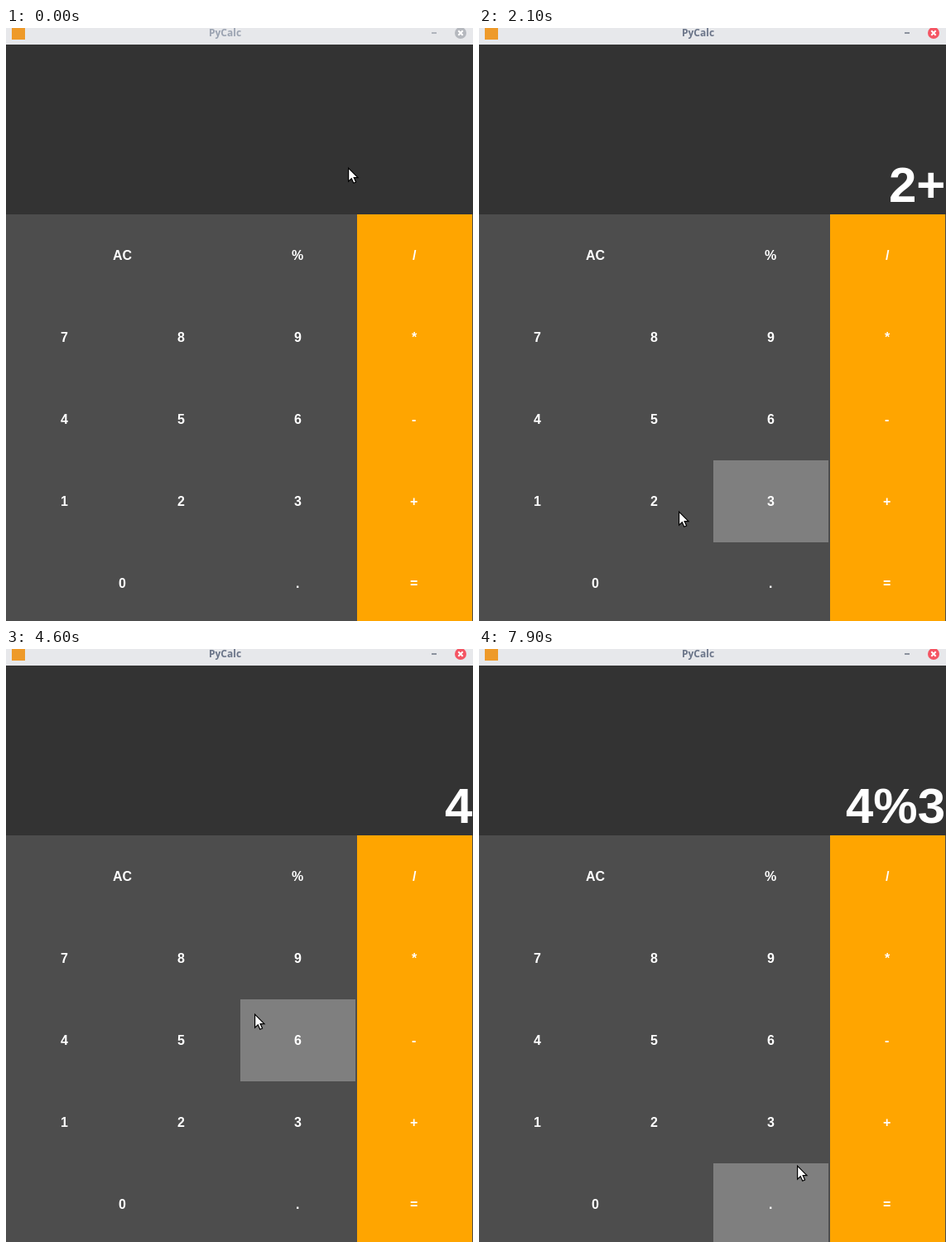
An HTML page with a canvas for the animation above (8 s loop, 564x716 px).

```html
<!DOCTYPE html>
<html lang="en">
<head>
<meta charset="utf-8">
<title>PyCalc</title>
<style>
html, body { margin: 0; width: 564px; height: 716px; overflow: hidden; background: #333; }
canvas { display: block; }
</style>
</head>
<body>
<canvas width="564" height="716"></canvas>
<script>
const ctx = document.querySelector("canvas").getContext("2d");
const LOOP = 8000, STEP = 100, HOVER_LAG = 80;
const SANS = "'Liberation Sans', Arial, sans-serif";

const buttons = ["AC|%|/", "7|8|9|*", "4|5|6|-", "1|2|3|+", "0|.|="].flatMap((line, row) => {
  const labels = line.split("|"), hasWide = labels.length === 3;
  return labels.map((label, i) => {
    const wide = hasWide && i === 0, col = i + (hasWide && i > 0 ? 1 : 0);
    return {
      label, y: 225 + row * 99,
      x: wide ? 4 : col * 141 + 1,
      w: wide ? 274 : 139,
      mid: wide ? 141 : col * 141 + 70.5,
      color: col === 3 ? "#ffa500" : "#4d4d4d"
    };
  });
});

// Stops of the pointer: first step, last step, x, y
const stops = [
  [0, 0, 413, 168], [300, 500, 350, 282], [700, 900, 248, 454], [1000, 1100, 222, 560],
  [1400, 1700, 455, 565], [1900, 2000, 330, 580], [2100, 2100, 241, 583],
  [2400, 2900, 462, 650], [3200, 3500, 255, 293], [4300, 4600, 300, 440],
  [4700, 5100, 359, 318], [5600, 5900, 350, 298], [6500, 6500, 318, 406],
  [6600, 6700, 337, 556], [7400, 7400, 345, 547], [7700, 7900, 384, 623]
];
const clicks = [1300, 1800, 2300, 3100, 6300, 7300];

const easeOut = p => 1 - (1 - p) ** 3;

function pointerAt(t) {
  let x = 0, y = 0;
  for (const [first, last, endX, endY] of stops) {
    const start = first - STEP;
    if (t <= start) break;
    const p = easeOut(Math.min(1, (t - start) / (last - start)));
    x += (endX - x) * p;
    y += (endY - y) * p;
  }
  return [Math.round(x), Math.round(y)];
}

function labelAt(t) {
  const [x, y] = pointerAt(t);
  return buttons.find(b => x >= b.x && x < b.x + b.w && y >= b.y && y < b.y + 99)?.label;
}

function press(shown, label) {
  if (label !== "=") return shown + label;
  return String(shown.split("+").reduce((sum, n) => sum + Number(n), 0));
}

// A clicked button stays unlit until the pointer leaves it.
function stateAt(t) {
  const pressed = clicks.filter(at => at <= t).map(labelAt);
  const under = labelAt(t - HOVER_LAG);
  return {
    shown: pressed.reduce(press, ""),
    hover: under === pressed.at(-1) ? null : under,
    focused: pressed.length > 0
  };
}

function rect(color, x, y, w, h) {
  ctx.fillStyle = color;
  ctx.fillRect(x, y, w, h);
}

// Text starts on a whole pixel; align is the part of its width left of x.
function text(str, x, y, font, color, align = 0.5, snap = Math.floor) {
  ctx.font = font;
  ctx.fillStyle = color;
  ctx.fillText(str, snap(x - ctx.measureText(str).width * align), y);
}

function drawTitleBar(focused) {
  rect("#e7e8eb", 0, 0, 564, 20);
  rect("#ee9a2a", 7, -2, 16, 16);
  text("PyCalc", 265, 10, "bold 12px 'Noto Sans', 'Open Sans', sans-serif", focused ? "#6b7589" : "#9ba3b1");
  rect(focused ? "#8b919d" : "#b0b4bc", 514, 5, 6, 2);
  ctx.fillStyle = focused ? "#f45563" : "#b5b8be";
  ctx.beginPath();
  ctx.arc(549, 6, 7, 0, 7);
  ctx.fill();
  ctx.strokeStyle = "#fff";
  ctx.lineWidth = 2;
  ctx.stroke(new Path2D("M546.3 3.3l5.4 5.4m0-5.4l-5.4 5.4"));
}

const arrow = new Path2D("M.6 1.2V17.2L4.3 13.8L6.8 19.2L9.6 18L7.2 12.6H12Z");

function drawPointer(x, y) {
  ctx.save();
  ctx.translate(x, y);
  ctx.fillStyle = "#fff";
  ctx.strokeStyle = "#000";
  ctx.lineWidth = 1.2;
  ctx.fill(arrow);
  ctx.stroke(arrow);
  ctx.restore();
}

function draw(now) {
  const t = Math.floor(now % LOOP / STEP) * STEP;
  const { shown, hover, focused } = stateAt(t);
  rect("#333", 0, 20, 564, 205);
  rect("#4d4d4d", 0, 225, 564, 491);
  drawTitleBar(focused);
  text(shown, 563, 210, `bold 60px ${SANS}`, "#fff", 1, Math.ceil);
  for (const b of buttons) {
    rect(b.label === hover ? "#7f7f7f" : b.color, b.x, b.y, b.w, 99);
    text(b.label, b.mid, b.y + 55, `bold 16px ${SANS}`, "#fff");
  }
  drawPointer(...pointerAt(t));
  requestAnimationFrame(draw);
}
draw(performance.now());
</script>
</body>
</html>
```
